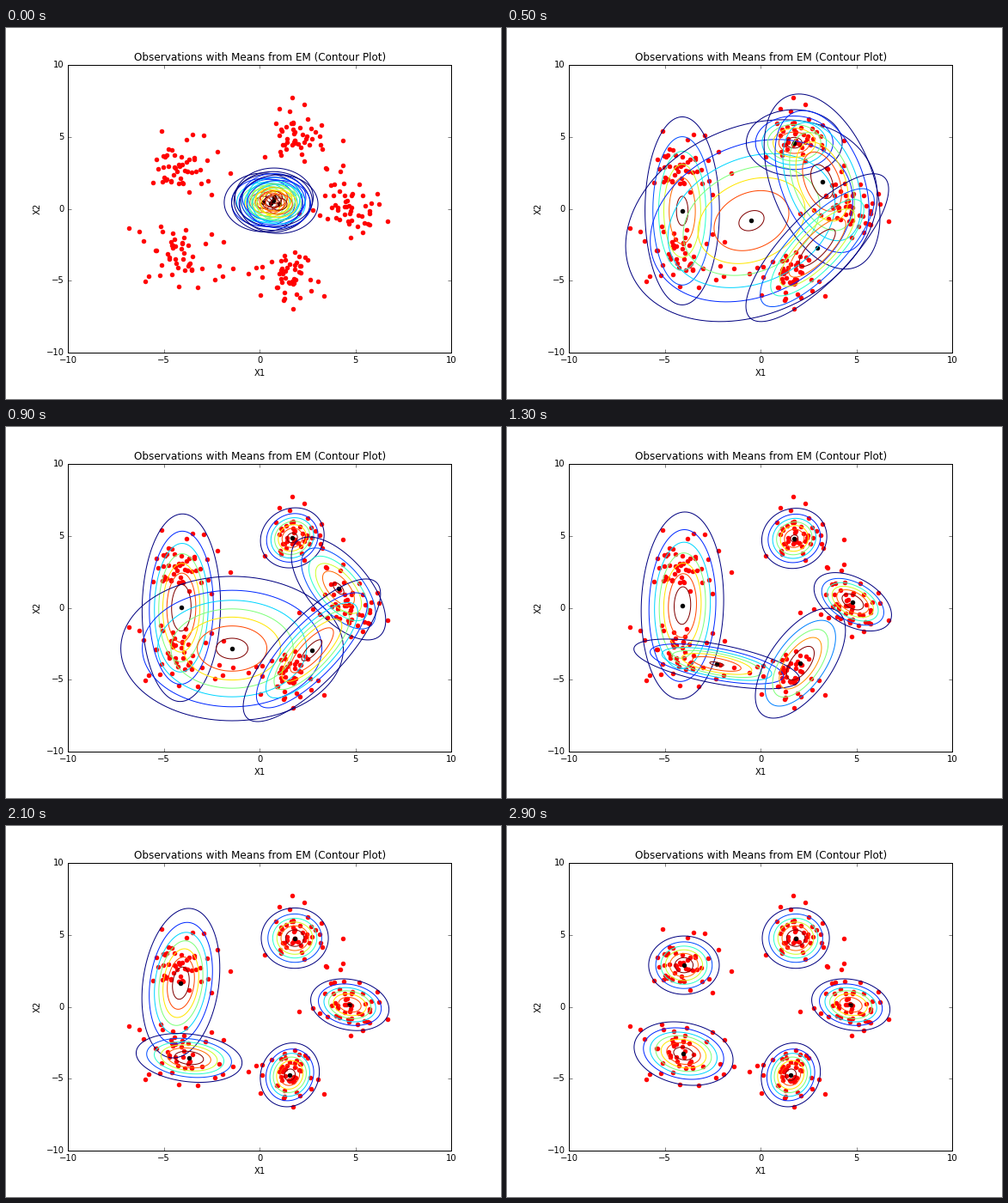
A matplotlib script for the animation above (3900 ms loop, 576 by 432 pixels).

```python
import numpy as np
import matplotlib.pyplot as plt
from matplotlib.animation import FuncAnimation
from matplotlib.collections import LineCollection
from matplotlib.ticker import MaxNLocator

plt.rcParams.update({
    "font.family": "DejaVu Sans", "font.size": 10, "axes.titlesize": 12,
    "axes.titlepad": 5, "axes.labelpad": 5, "axes.linewidth": 1,
    "xtick.direction": "in", "ytick.direction": "in",
    "xtick.top": True, "ytick.right": True,
    "xtick.major.size": 4, "ytick.major.size": 4,
    "xtick.major.width": 0.5, "ytick.major.width": 0.5,
    "xtick.major.pad": 4, "ytick.major.pad": 4,
    "ytick.alignment": "center", "text.hinting": "auto",
})

FRAMES, INTERVAL = 39, 100
OUTER_SIGMA = 2.0
ANGLE = np.linspace(0, 2 * np.pi, 121)
JET = plt.get_cmap("jet")

# Per component: step, mean x, mean y, outer ring half width and height, correlation.
FITS = [
    [(5, -4.09, -0.14, 1.94, 6.54, 0), (13, -4.08, 0.16, 2.15, 6.51, 0.06),
     (17, -4.17, 0.82, 1.95, 5.9, 0.18), (21, -4.11, 1.65, 2.03, 5.2, 0.2),
     (27, -4.0, 2.9, 1.84, 2.03, 0)],
    [(5, -0.48, -0.82, 6.56, 7.02, 0.25), (9, -1.44, -2.83, 5.8, 5.02, 0),
     (13, -2.29, -3.9, 4.32, 1.73, -0.6), (17, -2.97, -3.73, 3.9, 1.67, -0.5),
     (21, -3.68, -3.55, 2.76, 1.7, -0.2), (27, -4.02, -3.25, 2.58, 2.21, -0.2)],
    [(5, 1.75, 4.6, 2.5, 2.3, 0), (9, 1.7, 4.87, 1.66, 2.09, 0.1),
     (19, 1.83, 4.78, 1.75, 2.1, 0)],
    [(5, 3.2, 1.9, 3.02, 6.09, -0.4), (9, 4.11, 1.35, 2.46, 3.58, -0.62),
     (13, 4.8, 0.42, 2.02, 2.03, -0.45), (17, 4.7, 0.15, 2.04, 1.8, -0.18)],
    [(5, 2.95, -2.7, 3.72, 5.14, 0.79), (9, 2.72, -2.95, 3.58, 4.96, 0.79),
     (13, 2.07, -3.85, 2.35, 3.82, 0.6), (18, 1.57, -4.73, 1.54, 2.22, 0.1)],
]
STARTS = [(0.19, 0.45), (0.58, 0.4), (0.75, 0.8), (0.7, 0.55), (1.0, 0.33)]

OUTLIERS = [
    (-5.1, 5.4), (-3.5, 5.2), (-2.9, 5.1), (-2.2, 4.0), (-1.55, 2.5), (-2.5, 1.0),
    (-6.8, -1.35), (-6.3, -1.55), (-5.95, -5.05), (-4.2, -5.4), (-2.35, -4.9),
    (1.7, 7.75), (2.3, 7.25), (1.0, 6.95), (2.5, 6.25), (4.35, 4.75), (4.35, 3.0),
    (4.2, 2.6), (2.05, -0.35), (4.75, -2.0), (6.65, -0.85), (6.15, 1.05),
    (1.75, -6.95), (3.35, -6.05), (3.05, -5.05), (0.05, -6.0), (-0.2, -4.1),
    (-0.6, -4.5), (-1.4, -4.15),
]


def build_track(start, fit):
    """Unit circles first, then one broad step on the way to the first fit."""
    fit = np.array(fit)
    unit = np.array([0, *start, 2.04, 2.04, 0])
    broad = (fit[0] + [0, 0, 0, 7, 8, 0]) / 2
    broad[0] = 1
    broad[1:3] = 0.7 * fit[0, 1:3]
    return np.vstack([unit, broad, fit])


def observations():
    rng = np.random.default_rng(5)
    cores = []
    for fit in FITS:
        mx, my, a, b, rho = fit[-1][1:]
        u, v = np.clip(rng.normal(0, 0.43, (2, 44)), -0.95, 0.95)
        cores.append(np.column_stack([mx + a * u, my + b * (rho * u + v)]))
    return np.vstack([*cores, OUTLIERS])


def component(track, step):
    return [np.interp(step, track[:, 0], column) for column in track[:, 1:].T]


def rings(mx, my, a, b, rho):
    """Contour ellipses of a bivariate normal at evenly spaced densities."""
    flat = np.sqrt(1 - rho ** 2)
    peak = OUTER_SIGMA ** 2 / (2 * np.pi * a * b * flat)
    levels = MaxNLocator(8).tick_values(0, peak)
    levels = levels[(levels > peak * 1e-6) & (levels < peak * 0.9999)]
    radii = np.sqrt(np.log(peak / levels) / np.log(peak / levels[0]))
    u = a * np.cos(ANGLE)
    v = b * (rho * np.cos(ANGLE) + flat * np.sin(ANGLE))
    paths = [np.column_stack([mx + r * u, my + r * v]) for r in radii]
    return paths, JET(np.linspace(0, 1, len(levels)))


tracks = [build_track(*pair) for pair in zip(STARTS, FITS)]

fig = plt.figure(figsize=(8, 6), dpi=72, facecolor="white")
ax = fig.add_axes([0.125, 0.125, 0.775, 0.775])
ax.set(xlim=(-10, 10), ylim=(-10, 10), xlabel="X1", ylabel="X2",
       xticks=range(-10, 11, 5), yticks=range(-10, 11, 5),
       title="Observations with Means from EM (Contour Plot)")

ax.scatter(*observations().T, s=20, c="red", edgecolors="red", linewidths=1, zorder=1)
means = ax.scatter([], [], s=20, c="black", edgecolors="black", linewidths=1, zorder=1.1)
contours = ax.add_collection(LineCollection([], linewidths=1, zorder=2), autolim=False)


def draw(step):
    state = [component(track, step) for track in tracks]
    drawn = [rings(*s) for s in state]
    means.set_offsets([s[:2] for s in state])
    contours.set_segments([path for paths, _ in drawn for path in paths])
    contours.set_color(np.vstack([colors for _, colors in drawn]))
    return means, contours


anim = FuncAnimation(fig, draw, frames=FRAMES, interval=INTERVAL,
                     repeat=True, repeat_delay=0, blit=False)
plt.show()
```
